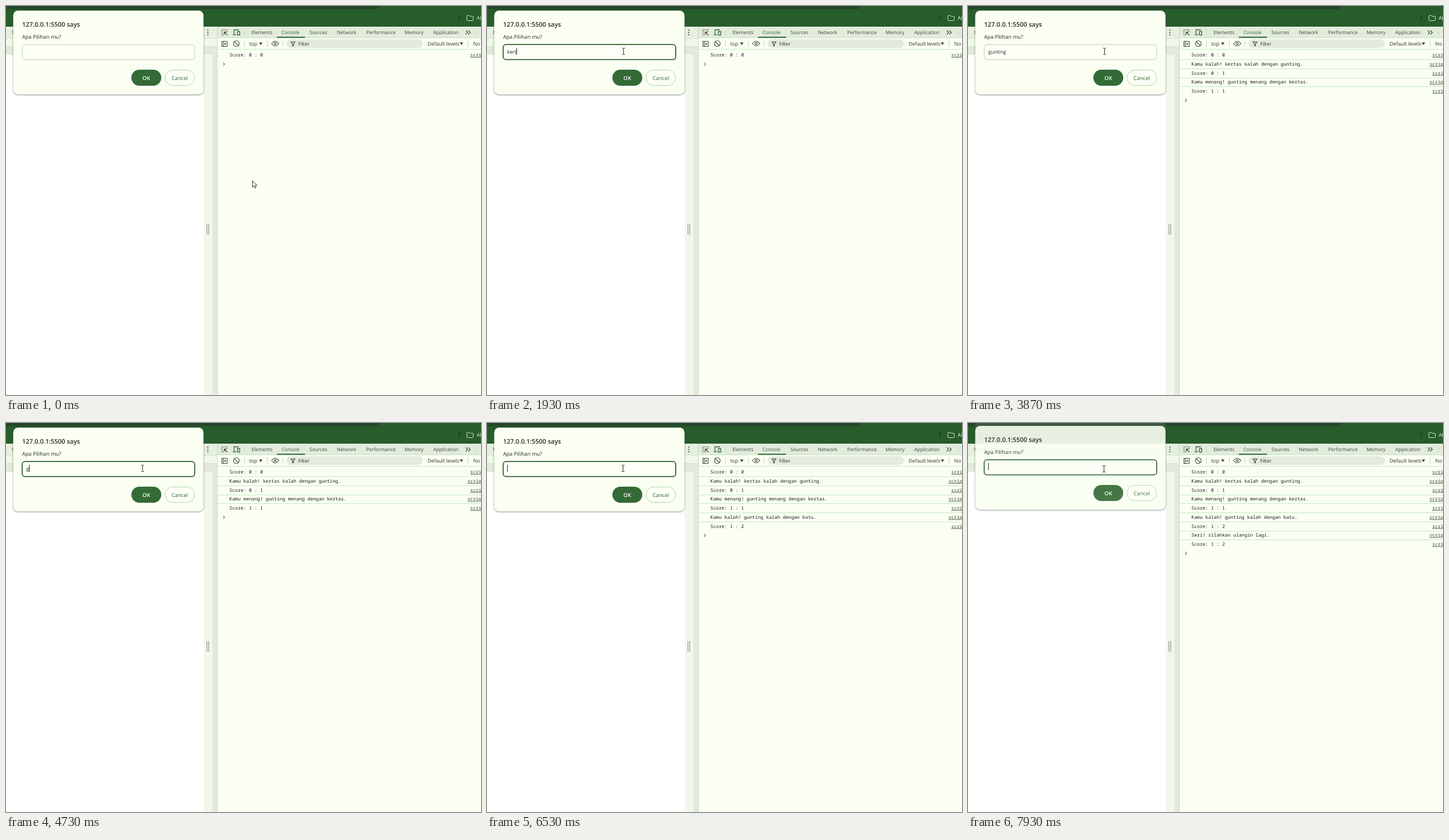
Write an HTML page that moves like this. It is 826 by 678 pixels and loops after 8000 ms.

```html
<!DOCTYPE html>
<html lang="id">
<head>
<meta charset="utf-8">
<title>Console game</title>
<style>
html, body { margin: 0; width: 100%; height: 100%; overflow: hidden; background: #fbfff3; }
svg { display: block; width: 826px; height: 678px; }
text { font-family: "Open Sans", "Noto Sans", sans-serif; fill: #262b25; text-rendering: geometricPrecision; white-space: pre; }
.tabs text { font-size: 8.45px; fill: #3b4539; }
.tabs .on { fill: #2c6330; }
.bar text { font-size: 8.85px; fill: #2c322b; }
.mono text { font: 8.08px "Noto Sans Mono", "DejaVu Sans Mono", monospace; fill: #1c201b; }
.mono .link { fill: #2f4a30; text-decoration: underline; }
.mono line { stroke: #c3e9bf; }
.icon { fill: none; stroke: #424b40; stroke-width: 1.15; }
.sep { stroke: #b5dfb2; }
.panel { fill: #fafff2; filter: drop-shadow(0 1px 1.5px rgba(20, 40, 20, .5)); }
.field { fill: #fcfff6; stroke: #bdcab7; }
.focus .field { stroke: #2d6331; stroke-width: 1.8; }
.caret { fill: #20251f; visibility: hidden; }
.focus .caret { visibility: visible; }
.focus.blink .caret { visibility: hidden; }
</style>
</head>
<body>
<svg viewBox="0 0 826 678">
  <!-- browser frame -->
  <rect width="826" height="678" fill="#fbfff3"/>
  <rect width="826" height="36" fill="#275c2b"/>
  <path d="M0 0H649Q648 5.5 642 5.5H0Z" fill="#27442c"/>
  <path d="M788.5 15V26" stroke="#16391a" stroke-width="1.2"/>
  <path d="M801.5 17.5Q801.5 16.5 802.5 16.5H805.5L807 18H811.5Q812.5 18 812.5 19V24.5Q812.5 25.5 811.5 25.5H802.5Q801.5 25.5 801.5 24.5Z" fill="none" stroke="#d3ead0"/>
  <text x="818.5" y="24" font-size="9" style="fill:#e6f5e3">All Bookmarks</text>

  <!-- device view -->
  <rect y="36" width="367" height="20" fill="#e7efe1"/>
  <rect y="56" width="367" height="15" fill="#f0f8ea"/>
  <path d="M0 56.5H367M0 70.5H367" stroke="#c8edc4"/>
  <rect y="71" width="367" height="14" fill="#e2eadc"/>
  <rect y="85" width="344" height="593" fill="#fff"/>
  <rect x="344" y="85" width="15" height="593" fill="#f0f7eb"/>
  <rect x="359" y="71" width="8" height="607" fill="#e2eadd"/>
  <path d="M349.5 380V398.500M352.500 380V398.500" stroke="#7f867d"/>
  <g fill="#3b4339"><circle cx="351" cy="42" r="1.1"/><circle cx="351" cy="46" r="1.1"/><circle cx="351" cy="50" r="1.1"/></g>
  <g class="tabs"><text x="10.500" y="49.300">No throttling</text></g>
  <path d="M66 44H71.500L68.750 48Z" fill="#424b40"/>
  <path class="sep" d="M84.500 41V52"/>
  <path class="icon" d="M92 44Q96.500 40 101 44M94 47Q96.500 44.500 99 47M92 41L101 51"/>

  <!-- tab row -->
  <rect x="368" y="36" width="458" height="20" fill="#e3ebdd"/>
  <path d="M368 55.500H826M368 75.500H826" stroke="#c3e9bf"/>
  <path d="M367.500 36V678" stroke="#c9d8c4"/>
  <rect x="471" y="53.500" width="49" height="2" fill="#2f6833"/>
  <g class="icon">
    <path d="M379 50.500H375.500V41.500H384.500V45" stroke-dasharray="1.6 1"/>
    <path d="M385 51L379.500 45.500M379.500 49.500V45.500H383.500" stroke-width="1.3"/>
    <path d="M405 41.500H396.500V48.500M394.500 50H400M402.500 44.500H406.500V50.500H402.500Z" stroke="#2f6833" stroke-width="1.3"/>
    <path d="M799.500 42.500L803 46L799.500 49.500M804 42.500L807.500 46L804 49.500"/>
  </g>
  <path class="sep" d="M414.500 41V51M818.500 41V51"/>
  <g class="tabs">
    <text x="427" y="49.300">Elements</text>
    <text x="479" y="49.300" class="on">Console</text>
    <text x="527.800" y="49.300">Sources</text>
    <text x="575.500" y="49.300">Network</text>
    <text x="626.500" y="49.300">Performance</text>
    <text x="693" y="49.300">Memory</text>
    <text x="743" y="49.300">Application</text>
  </g>

  <!-- console toolbar -->
  <rect x="487.500" y="58" width="237.500" height="15" rx="7.500" fill="#e2ebdc"/>
  <g class="icon">
    <path d="M375.500 61.500H384.500V70.500H375.500ZM378 61.500V70.500"/>
    <path d="M380 64L383 66L380 68Z" fill="#424b40" stroke="none"/>
    <circle cx="400.500" cy="65.500" r="5"/>
    <path d="M397 62L404 69"/>
    <path d="M462 65.500Q468 57.500 474.500 65.500Q468 73.500 462 65.500Z"/>
    <circle cx="468.200" cy="65.500" r="1.700"/>
    <path d="M495.500 62.500H502.500L499.800 66V69.500H498.200V66Z"/>
  </g>
  <path class="sep" d="M414.500 60V71M454.500 60V71M481.500 60V71M803.500 60V71"/>
  <path d="M440 63.500H446L443 68.300ZM789 63.500H795L792 68.300Z" fill="#424b40"/>
  <g class="bar">
    <text x="423" y="69">top</text>
    <text x="508" y="69" style="font-size:8.4px">Filter</text>
    <text x="733" y="69">Default levels</text>
    <text x="812.500" y="69">No Issues</text>
  </g>

  <g class="mono" id="log"></g>
  <path id="prompt" class="icon" d="M377.500 -2.700L380.300 0L377.500 2.700" style="stroke:#5e7a5d"/>

  <g id="box">
    <rect class="panel" x="12.500" y="8" width="331" height="146" rx="8.500"/>
    <text x="28" y="36" font-size="11" font-weight="600">127.0.0.1:5500 says</text>
    <text x="28" y="57.300" font-size="9.150">Apa Pilihan mu?</text>
    <rect class="field" x="28.200" y="67.200" width="300" height="26.200" rx="5"/>
    <text class="typed" x="35.300" y="83.200" font-size="8.700"></text>
    <rect class="caret" y="73" width="1" height="12"/>
    <rect x="218" y="111" width="52" height="28" rx="14" fill="#346a36"/>
    <text x="244" y="128.800" font-size="9.300" font-weight="600" text-anchor="middle" style="fill:#fff">OK</text>
    <rect x="276.500" y="111.500" width="51.500" height="27" rx="13.500" fill="#fcfff6" stroke="#abd5a5"/>
    <text x="302.200" y="128.800" font-size="9.200" text-anchor="middle" style="fill:#2c6330">Cancel</text>
  </g>

  <path id="arrow" d="M.5 .5V11.800L3.100 9.400L4.900 13.400L6.700 12.600L5 8.700H8.500Z" fill="#fff" stroke="#1d1d26" stroke-width=".9"/>
  <path id="beam" d="M-2.500 -5.500H-.8L0 -5L.8 -5.500H2.500M0 -5V5M-2.500 5.500H-.8L0 5L.8 5.500H2.500" fill="none" stroke="#23271f"/>
</svg>

<script>
const LOOP = 8000, ROW = 15.74;
const $ = id => document.getElementById(id);

const lines = [
  'Score: 0 : 0',
  'Kamu kalah! kertas kalah dengan gunting.', 'Score: 0 : 1',
  'Kamu menang! gunting menang dengan kertas.', 'Score: 1 : 1',
  'Kamu kalah! gunting kalah dengan batu.', 'Score: 1 : 2',
  'Seri! silahkan ulangin lagi.', 'Score: 1 : 2'
];

const sent = [[0, ''], [2270, 'kertas'], [3870, 'gunting'], [6400, 'gunting'], [7730, 'batu']];

const typed = [
  [0, ''], [1330, 'k'], [1470, 'ke'], [1600, 'ker'], [1930, 'kert'], [2070, 'kerta'], [2130, 'kertas'],
  [2270, ''], [2870, 'g'], [3070, 'gu'], [3200, 'gun'], [3270, 'gunt'], [3330, 'gunti'], [3470, 'guntin'], [3530, 'gunting'],
  [3870, ''], [4730, 'g'], [4870, 'gu'], [4930, 'gun'], [5070, 'gunt'], [5270, 'guntn'], [5400, 'guntni'],
  [5600, 'guntn'], [5730, 'gunt'], [5870, 'gunti'], [5930, 'guntin'], [6070, 'gunting'],
  [6400, ''], [6930, 'b'], [7000, 'ba'], [7130, 'bat'], [7270, 'batu'], [7730, '']
];

// time, opacity of the leaving dialog, opacity of the arriving one
const fades = [
  [0, 0, 1],
  [2270, 1, 0], [2330, .55, .4], [2400, .1, .9], [2470, 0, 1],
  [3870, 1, 0], [3930, .55, .4], [4000, .1, .9], [4070, 0, 1],
  [6400, 1, 0], [6470, .2, .85], [6530, 0, 1],
  [7730, 1, 0], [7800, .85, 0], [7870, .5, .4], [7930, .1, .9]
];

// resting places of the text cursor
const rests = [[0, 236, 79], [1400, 237, 79], [6000, 236, 79], [7070, 236, 80]];

const at = (list, t) => list.findLast(e => e[0] <= t);
const ease = p => p * p * (3 - 2 * p);

$('log').innerHTML = lines.map((s, i) => {
  const y = i * ROW, score = s.startsWith('Score');
  return `<g>${i ? `<line x1="368" x2="826" y1="${Math.round(77.5 + y) + .5}" y2="${Math.round(77.5 + y) + .5}"/>` : ''}
    <text x="388.600" y="${88.2 + y}">${s}</text>
    <text class="link" x="${score ? 807.3 : 802.4}" y="${88.2 + y}">script.js:${score ? 9 : 42}</text></g>`;
}).join('');
const rows = [...$('log').children];

const fresh = $('box'), gone = fresh.cloneNode(true);
gone.removeAttribute('id');
fresh.before(gone);

function place(box, text, alpha, dy) {
  box.style.display = alpha ? '' : 'none';
  box.setAttribute('opacity', alpha);
  box.setAttribute('transform', `translate(0 ${dy})`);
  const label = box.querySelector('.typed');
  if (label.textContent !== text) label.textContent = text;
  const w = text && alpha ? label.getComputedTextLength() : 0;
  box.querySelector('.caret').setAttribute('x', Math.round(35.2 + w));
}

function pointer(t) {
  const step = Math.floor((t + 4) / 66.7);
  const p = ease(Math.min(step / 10, 1));
  let x = 428 - 192 * p, y = 304 - 225 * p;
  const inField = x < 328 && y < 93;
  if (step > 10) [, x, y] = at(rests, t);
  $('arrow').style.display = inField ? 'none' : '';
  $('beam').style.display = inField ? '' : 'none';
  $(inField ? 'beam' : 'arrow').setAttribute('transform', inField
    ? `translate(${x + .5} ${y})` : `translate(${x} ${y})`);
}

function draw(t) {
  const last = at(sent, t), count = 1 + 2 * sent.indexOf(last);
  rows.forEach((r, i) => r.style.display = i < count ? '' : 'none');
  $('prompt').setAttribute('transform', `translate(0 ${85.6 + count * ROW})`);

  const [, out, into] = at(fades, t);
  place(gone, last[1], out, -13 * (1 - out));
  place(fresh, at(typed, t)[1], into, -30 * (1 - into));
  fresh.classList.toggle('focus', t >= 730);
  fresh.classList.toggle('blink', t >= 4400 && t < 4730);
  pointer(t);
}

const start = performance.now();
function tick() {
  draw((performance.now() - start) % LOOP);
  requestAnimationFrame(tick);
}
tick();
</script>
</body>
</html>
```
